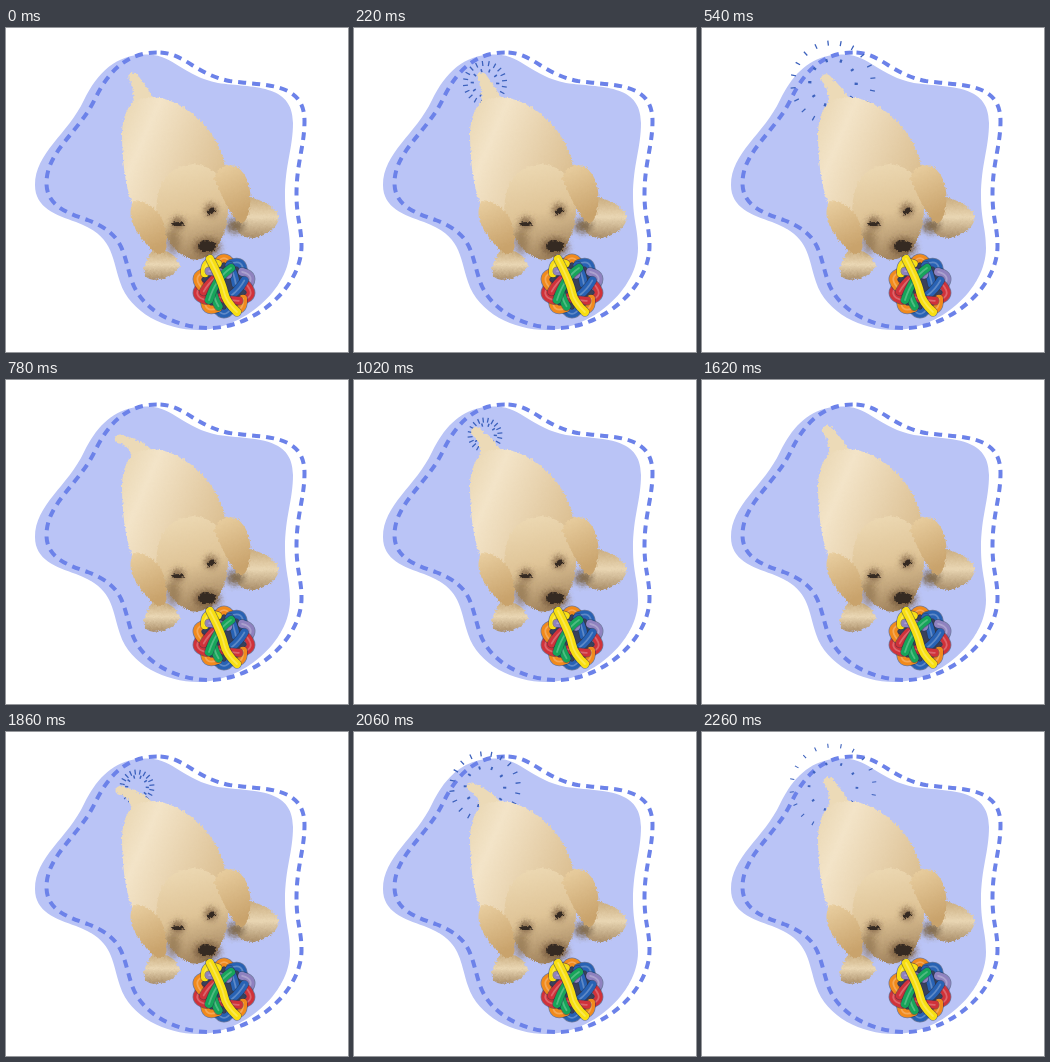
An HTML page for the animation above (2.3 s loop, 342 by 324 pixels).

```html
<!DOCTYPE html>
<html lang="en">
<head>
<meta charset="utf-8">
<title>Puppy wagging its tail</title>
<style>
html, body { margin: 0; width: 100%; height: 100%; overflow: hidden; background: #fff; }
svg { display: block; width: 342px; height: 324px; }
</style>
</head>
<body>
<svg viewBox="0 0 342 324">
  <defs>
    <path id="outline" d="M143 26.5 C168 28 178 48 212 55 C246 60 287 55 287 95 C287 120 279 137 279 168
      C279 193 284 200 284 220 C284 262 236 302 192 302 C160 302 124 285 114 254
      C105 226 107 208 70 194 C50 187 29 180 29 157 C29 125 62 106 78 72 C92 43 112 25 143 26.5Z"/>
    <linearGradient id="coat" x1="0" y1="0" x2="1" y2="0.5">
      <stop offset="0" stop-color="#e8d5b0"/>
      <stop offset="0.3" stop-color="#f3e4c8"/>
      <stop offset="1" stop-color="#dcc093"/>
    </linearGradient>
    <linearGradient id="face" x1="0.4" y1="0" x2="0.6" y2="1">
      <stop offset="0" stop-color="#ecd8b2"/>
      <stop offset="0.5" stop-color="#dfc497"/>
      <stop offset="1" stop-color="#a0825c"/>
    </linearGradient>
    <linearGradient id="ear" x1="0" y1="0" x2="0.3" y2="1">
      <stop offset="0" stop-color="#ead0a2"/>
      <stop offset="1" stop-color="#c9a36c"/>
    </linearGradient>
    <linearGradient id="paw" x1="0" y1="0" x2="0" y2="1">
      <stop offset="0" stop-color="#c8aa7c"/>
      <stop offset="0.5" stop-color="#e9d6b3"/>
      <stop offset="1" stop-color="#a98d68"/>
    </linearGradient>
    <filter id="soft" x="-40%" y="-40%" width="180%" height="180%"><feGaussianBlur stdDeviation="3"/></filter>
    <filter id="fur">
      <feTurbulence type="fractalNoise" baseFrequency="0.4" numOctaves="2" seed="4"/>
      <feDisplacementMap in="SourceGraphic" scale="4" xChannelSelector="R" yChannelSelector="G"/>
    </filter>
  </defs>

  <use href="#outline" fill="#bac4f6"/>
  <use href="#outline" transform="translate(11.5 -2)" fill="none" stroke="#6c82e9" stroke-width="4" stroke-dasharray="8 6"/>
  <g fill="none" stroke="#3d62bd">
    <path id="rays"/>
    <path id="dots"/>
  </g>

  <g filter="url(#fur)">
    <path id="tail" fill="#ecdab7"/>
    <path fill="url(#coat)" d="M129 72 Q116 84 116 106 Q116 160 132 188 L218 190 L222 150 C218 110 185 72 147 69Z"/>
    <path fill="url(#paw)" d="M240 168 Q272 176 273 191 Q268 206 248 210 Q232 210 228 196Z"/>
    <path fill="url(#paw)" d="M147 221 Q170 222 174 238 Q168 250 148 252 Q128 250 147 221Z"/>
    <ellipse cx="229" cy="198" rx="9" ry="7" fill="#806a4f" filter="url(#soft)"/>
    <path fill="url(#face)" d="M150 182 Q152 138 188 136 Q222 140 222 180 Q222 205 209 222 Q198 234 184 231 Q160 222 150 182Z"/>
    <ellipse cx="167" cy="213" rx="7" ry="13" fill="#8f7350" opacity=".7" filter="url(#soft)"/>
    <path fill="url(#ear)" d="M128 172 Q150 174 158 196 Q164 224 156 226 Q146 227 130 202 Q120 186 128 172Z"/>
    <path fill="url(#ear)" d="M208 150 Q214 134 230 138 Q247 150 244 178 Q241 196 234 195 Q226 192 208 150Z"/>
    <g fill="#7d6143" filter="url(#soft)">
      <circle cx="172" cy="195" r="6"/>
      <circle cx="205" cy="182" r="6"/>
      <ellipse cx="201" cy="219" rx="13" ry="9"/>
    </g>
    <g fill="#352a23">
      <ellipse cx="172" cy="196" rx="6" ry="2"/>
      <ellipse cx="205" cy="183" rx="5" ry="2.4" transform="rotate(-30 205 183)"/>
      <ellipse cx="201" cy="218" rx="9" ry="6"/>
    </g>
  </g>

  <g id="toy" fill="none" stroke-linecap="round" transform="translate(218 258)"></g>
</svg>
<script>
const $ = id => document.getElementById(id);
const polar = (r, deg) => [r * Math.cos(deg * Math.PI / 180), r * Math.sin(deg * Math.PI / 180)];

const ORANGE = "#f18a1c", BLUE = "#2862b4", PURPLE = "#8f82bf", RED = "#d0323a", YELLOW = "#f8df12", GREEN = "#17a55a";

function strand(d, color) {
  for (const [stroke, width] of [["#26314780", 9.5], [color, 8], ["#ffffff40", 1.8]]) {
    $("toy").insertAdjacentHTML("beforeend", `<path d="${d}" stroke="${stroke}" stroke-width="${width}"/>`);
  }
}

// Woven ball: a rim of bulges, a pinwheel inside it, two straps across.
function drawToy() {
  $("toy").innerHTML = `<circle r="24" fill="#39415c"/>`;
  const rim = [ORANGE, BLUE, PURPLE, RED, ORANGE, BLUE, ORANGE, RED, ORANGE, YELLOW];
  rim.forEach((color, i) => {
    const a = i * 36 - 90;
    strand(`M${polar(23, a - 20)}Q${polar(34, a)} ${polar(23, a + 20)}`, color);
  });
  [BLUE, BLUE, RED, GREEN, RED, PURPLE].forEach((color, i) => {
    const a = i * 60 - 50;
    strand(`M${polar(21, a - 25)}Q${polar(16, a)} ${polar(12, a + 40)}`, color);
  });
  strand("M-15 14Q-8 -8 7 -18", GREEN);
  strand("M-14 -27Q-2 -4 0 6T13 26", YELLOW);
}

const STEP = 40, HOLD = 100, LOOP = 2300;
const WAG = 28, BURST = 21, BURST_LIFE = 18;

// Mostly at rest, with one soft swing to the left per wag.
function tailAngle(step) {
  const swing = (1 + Math.cos(2 * Math.PI * (step - 18.5) / WAG)) / 2;
  return -19 - 33 * swing ** 2.5;
}

function drawTail(angle) {
  const at = (turn, len, side) => {
    const [ux, uy] = polar(1, turn - 90);
    return [138 + len * ux - side * uy, 78 + len * uy + side * ux];
  };
  const bend = angle * 0.45;
  $("tail").setAttribute("d",
    `M127 84Q${at(bend, 18, -6)} ${at(angle, 30, -5)}` +
    `C${at(angle, 37, -6)} ${at(angle, 37, 4)} ${at(angle, 30, 5)}` +
    `Q${at(bend, 18, 6)} 150 74Z`);
}

function ring(id, count, turn, far, len, width) {
  let d = "";
  for (let i = 0; i < count; i++) {
    const a = turn + i * 360 / count;
    d += `M${polar(far - len, a)}L${polar(far, a)}`;
  }
  $(id).setAttribute("d", d);
  $(id).setAttribute("transform", "translate(131 55)");
  $(id).setAttribute("stroke-width", width);
}

function drawBurst(step) {
  const p = (step % BURST) / BURST_LIFE;
  const shown = p > 0 && p < 1;
  $("rays").style.display = $("dots").style.display = shown ? "" : "none";
  if (!shown) return;
  const grow = 1 - (1 - p) ** 2.7;
  const fade = Math.min(1, (1 - p) * 3);
  ring("rays", 20, -7, 45 * grow, 5 * fade, 1.3 * fade);
  ring("dots", 10, 2, 3 + 23 * grow, 3.2 * fade, (1.2 + 1.6 * p) * fade);
}

drawToy();
const start = performance.now();
function frame() {
  const t = Math.max(0, performance.now() - start) % LOOP;
  const step = t < HOLD ? 0 : 1 + Math.floor((t - HOLD) / STEP);
  drawTail(tailAngle(step));
  drawBurst(step);
  requestAnimationFrame(frame);
}
frame();
</script>
</body>
</html>
```
